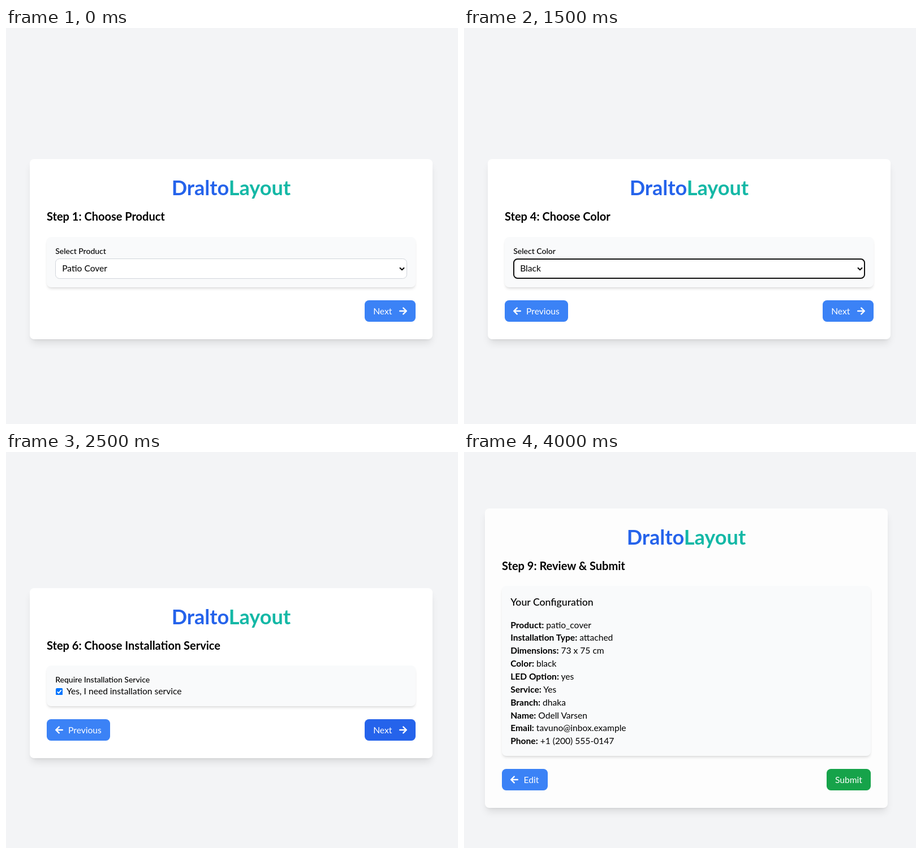
These frames come from a looping animation (799x701 px, 4.5 s). An HTML page:

```html
<!DOCTYPE html>
<html lang="en">
<head>
<meta charset="utf-8">
<title>Configurator</title>
<style>
  * { box-sizing: border-box; margin: 0; }
  html, body { width: 100%; height: 100%; overflow: hidden; }
  body { position: relative; background: #f3f4f6; color: #000; font: 15.6px/22.86px Lato, "Open Sans", sans-serif; white-space: nowrap; }
  .page { position: absolute; left: 42px; top: 0; width: 712px; height: 783px; display: flex; align-items: center; visibility: hidden; }
  .page.scrolled { left: 37px; height: 730px; }
  .page.on { visibility: visible; }
  .card { width: 100%; padding: 30.5px 30px; background: #fff; border-radius: 7.6px; box-shadow: 0 9.5px 14.3px -2.9px #0000001a, 0 3.8px 5.7px -3.8px #0000001a; }
  .scrolled .card { background: #fdfdfd; }
  h1 { font-size: 36.1px; line-height: 38.1px; font-weight: 700; text-align: center; color: #2563eb; }
  h1 span { color: #14b8a6; }
  h2 { margin: 19px 0 22.9px; font-size: 20px; line-height: 26.7px; font-weight: 700; }
  h3 { margin-bottom: 15.2px; font-size: 17.7px; line-height: 26.7px; font-weight: 500; }
  .panel { padding: 15.2px; background: #f9fafb; border-radius: 7.6px; box-shadow: 0 3.8px 5.7px -1px #0000001a, 0 1.9px 3.8px -1.9px #0000001a; }
  .panel + .panel { margin-top: 15.2px; }
  .label { font-size: 14px; line-height: 19px; font-weight: 500; }
  .field { position: relative; display: flex; align-items: center; margin-top: 3.8px; background: #fff; border: 1px solid #d1d5db; border-radius: 7.6px; }
  .select { height: 36.2px; padding-left: 11px; }
  .input { height: 40px; padding-left: 7.6px; }
  .focus { outline: 2px solid #101010; outline-offset: -2px; }
  .chevron { position: absolute; right: 2.5px; top: 14.5px; }
  .caret { position: absolute; left: 7.6px; top: 10px; width: 1px; height: 18px; background: #000; }
  .check { display: flex; align-items: center; }
  .check svg { margin: 0 7px 0 .5px; }
  .buttons { display: flex; justify-content: space-between; margin-top: 22.9px; }
  .button { display: flex; align-items: center; justify-content: space-between; height: 38.1px; padding: 0 15.2px; border-radius: 7.6px; background: #3b82f6; color: #fff; }
  .previous { width: 112px; }
  .edit { width: 80.5px; }
  .next { width: 90px; margin-left: auto; }
  .hover { background: #2563eb; }
  .submit { width: 78px; justify-content: center; background: #16a34a; }
  svg { display: block; fill: none; flex: none; }
</style>
</head>
<body>
<script>
const STEP_MS = 500;
const person = { name: "Odell Varsen", email: "tavuno@inbox.example", phone: "+1 (200) 555-0147" };

const icon = (w, h, path, attrs) => `<svg width="${w}" height="${h}" viewBox="0 0 ${w} ${h}" ${attrs}>${path}</svg>`;
const stroke = 'stroke="#fff" stroke-width="2.4" stroke-linecap="round" stroke-linejoin="round"';
const arrowRight = icon(14, 14, '<path d="M1.2 7H12.4M7.3 1.6 12.8 7 7.3 12.4"/>', stroke);
const arrowLeft = icon(14, 14, '<path d="M12.8 7H1.6M6.7 1.6 1.2 7 6.7 12.4"/>', stroke);
const chevron = icon(10, 7, '<path d="M1 1.2 5 5.2 9 1.2"/>', 'class="chevron" stroke="#000" stroke-width="2"');
const checkbox = icon(12.4, 12.4,
  '<rect width="12.4" height="12.4" rx="2.2" fill="#0075ff"/><path d="M2.7 6.4 5.1 8.9 9.8 3.4" stroke="#fff" stroke-width="1.9"/>', "");

const panel = html => `<div class="panel">${html}</div>`;
const label = text => `<div class="label">${text}</div>`;
const select = (title, value, focus = "focus") =>
  panel(`${label(title)}<div class="field select ${focus}">${value}${chevron}</div>`);
const input = (title, value, focused) =>
  panel(`${label(title)}<div class="field input ${focused ? "focus" : ""}">${value}${focused ? '<i class="caret"></i>' : ""}</div>`);

const button = (kind, html) => `<div class="button ${kind}">${html}</div>`;
const previous = button("previous", arrowLeft + "<span>Previous</span>");
const next = (state = "") => button(`next ${state}`, "<span>Next</span>" + arrowRight);
const both = previous + next();
const bothHover = previous + next("hover");

const summary = [
  ["Product", "patio_cover"], ["Installation Type", "attached"], ["Dimensions", "73 x 75 cm"],
  ["Color", "black"], ["LED Option", "yes"], ["Service", "Yes"], ["Branch", "dhaka"],
  ["Name", person.name], ["Email", person.email], ["Phone", person.phone],
].map(([key, value]) => `<p><b>${key}:</b> ${value}</p>`).join("");

const steps = [
  ["Choose Product", select("Select Product", "Patio Cover", ""), next()],
  ["Choose Installation Type", select("Select Installation Type", "Attached"), both],
  ["Adjust Dimensions", input("Width (in cm)", 73) + input("Depth (in cm)", 75), both],
  ["Choose Color", select("Select Color", "Black"), both],
  ["Choose LED Option", select("Select LED Option", "Yes"), bothHover],
  ["Choose Installation Service",
    panel(label("Require Installation Service") + `<div class="check">${checkbox}Yes, I need installation service</div>`), bothHover],
  ["Choose Branch", select("Select Branch", "Dhaka"), both],
  ["Your Details",
    input("Name", person.name) + input("Email", person.email, true) + input("Phone Number", person.phone), both],
  ["Review &amp; Submit", panel("<h3>Your Configuration</h3>" + summary),
    button("edit", arrowLeft + "<span>Edit</span>") + button("submit", "Submit")],
];

const pages = steps.map(([title, content, buttons], i) => {
  const page = document.createElement("div");
  page.className = i < 7 ? "page" : "page scrolled";
  page.innerHTML = `<div class="card"><h1>Dralto<span>Layout</span></h1><h2>Step ${i + 1}: ${title}</h2>
    ${content}<div class="buttons">${buttons}</div></div>`;
  document.body.append(page);
  return page;
});

const start = performance.now();
function render() {
  const current = Math.floor((performance.now() - start) / STEP_MS) % pages.length;
  pages.forEach((page, i) => page.classList.toggle("on", i === current));
  requestAnimationFrame(render);
}
render();
</script>
</body>
</html>
```
